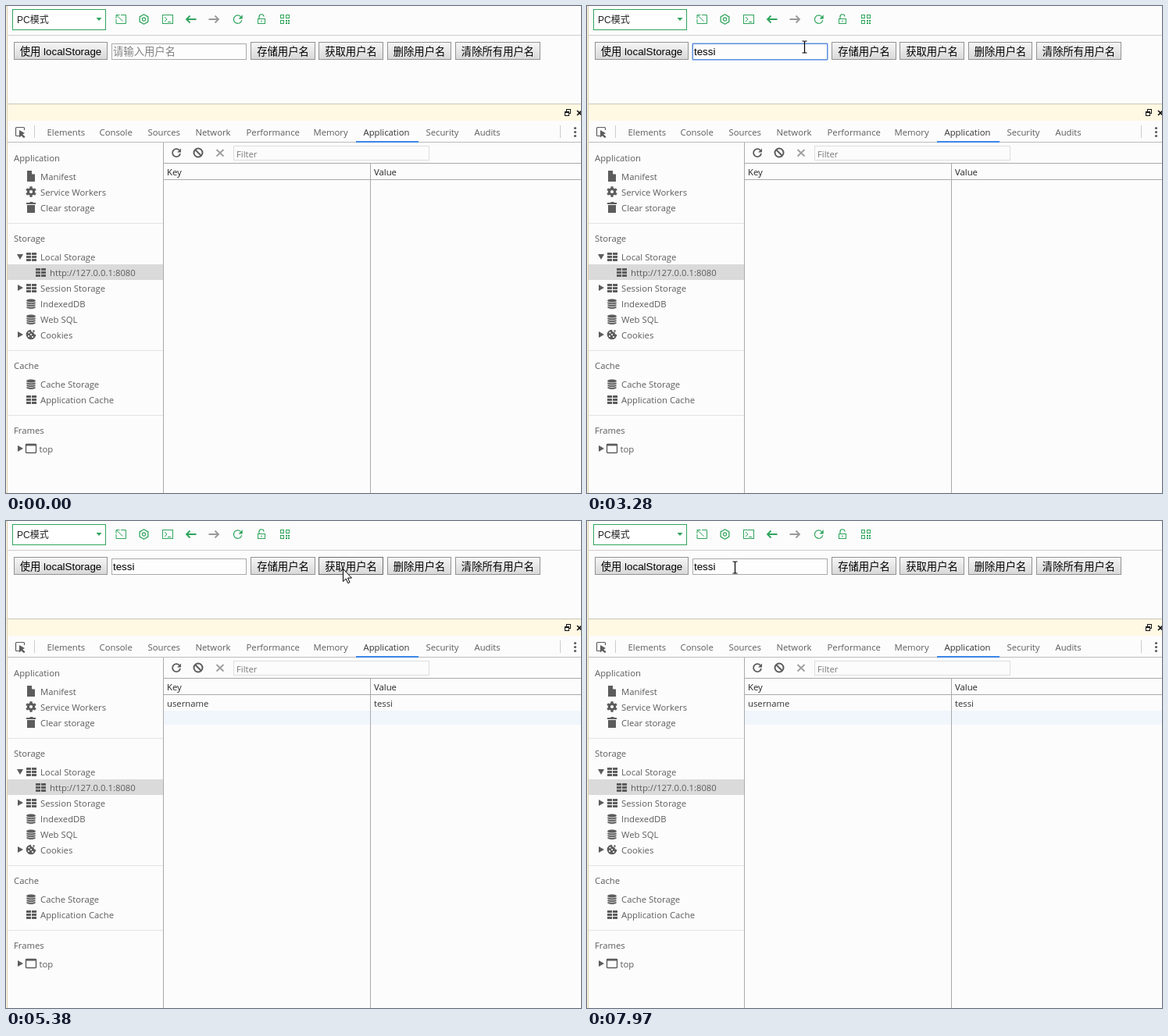
Animation, 736 px wide and 624 px high, one loop 8 s. Source, as an HTML page:

```html
<!DOCTYPE html>
<html lang="zh-CN">
<head>
<meta charset="utf-8">
<title>localStorage</title>
<style>
html, body { margin: 0; width: 100%; height: 100%; overflow: hidden; background: #fcfcfc; }
svg { display: block; }
text { white-space: pre; }
.dev { font: 11.3px "Open Sans", "Noto Sans", sans-serif; }
.form { font: 13.333px "Liberation Sans", "Noto Sans CJK SC", "Noto Sans CJK", sans-serif; }
.small { font-size: 12px; }
</style>
</head>
<body>
<svg id="stage" width="736" height="624" viewBox="0 0 736 624"></svg>
<script>
const NAME = "tessi", LOOP = 8000;
const GREEN = "#2fa45c", GREY = "#5c5c5c", LINE = "#aaaaaa";

const box = (x, y, w, h, fill, more = "") =>
  `<rect x="${x}" y="${y}" width="${w}" height="${h}" fill="${fill}" ${more}/>`;
const frame = (x, y, w, h, stroke, fill = "none", more = "") =>
  box(x + .5, y + .5, w - 1, h - 1, fill, `stroke="${stroke}" ${more}`);
const path = (d, stroke, fill = "none", more = "") =>
  `<path d="${d}" stroke="${stroke}" fill="${fill}" ${more}/>`;
const text = (x, y, s, fill = GREY, cls = "dev", more = "") =>
  `<text x="${x}" y="${y}" fill="${fill}" class="${cls}" ${more}>${s}</text>`;
const at = (x, y, s) => `<g transform="translate(${x} ${y})">${s}</g>`;

// Icons, centred on 0,0
const gear = () => {
  let s = `<circle r="3.6" fill="none" stroke="${GREY}" stroke-width="3"/>`;
  for (let a = 0; a < 360; a += 60) s += box(-1.6, -6.8, 3.2, 3, GREY, `transform="rotate(${a})"`);
  return s;
};
const grid = () => {
  let s = "";
  for (let i = 0; i < 6; i++) s += box(-6 + i % 2 * 7, -5 + (i >> 1) * 4, 6, 3, GREY);
  return s;
};
const disks = () => {
  let s = "";
  for (let i = 3; i >= 0; i--)
    s += `<ellipse cy="${i * 2.8 - 3.5}" rx="6.2" ry="2.5" fill="${GREY}" stroke="#fcfcfc" stroke-width=".8"/>`;
  return s;
};
const sheet = () => path("M-5-7H1L5-3V7H-5ZM1-7V-3H5", "none", GREY) + path("M1.5-7V-3H5", "#fcfcfc");
const bin = () => path("M-6-6H-2L-1-7H2L3-6H6V-4H-6ZM-5-3H5V7H-5Z", "none", GREY);
const cookie = () => path("M0-6.3A6.3 6.3 0 1 0 6.3 0Q3.5 0 3.5-2.8Q0-3 0-6.3Z", "none", GREY) +
  [[-2.5, -2.5], [-3, 2], [2, 3], [0, 0]].map(([x, y]) =>
    `<circle cx="${x}" cy="${y}" r="1.1" fill="#fcfcfc"/>`).join("") +
  `<circle cx="3.5" cy="-4.5" r="1.2" fill="${GREY}"/>`;
const pane = () => frame(-7, -6, 14, 12, GREY, "none", 'rx="1" stroke-width="1.4"') + box(-7, -6, 14, 2.5, GREY);
const opened = (x, y) => path(`M${x - 4} ${y - 3}h8l-4 7z`, "none", GREY);
const closed = (x, y) => path(`M${x - 3} ${y - 4}v8l7-4z`, "none", GREY);
const reload = (color, r, width) =>
  path(`M${r * .75} ${-r * .66}A${r} ${r} 0 1 0 ${r} ${r * .2}`, color, "none", `stroke-width="${width}"`) +
  path(`M${r + 1} ${-r - .5}v${r}h${-r}z`, "none", color);
const arrow = (color, flip) =>
  path("M6.5 0H-5.5M-1.5-4.5L-6 0L-1.5 4.5", color, "none", `stroke-width="1.8" transform="scale(${flip} 1)"`);

function browserBar() {
  let hex = "";
  for (let i = 0; i < 6; i++)
    hex += `${i ? "L" : "M"}${6.2 * Math.sin(i * Math.PI / 3)} ${-6.2 * Math.cos(i * Math.PI / 3)}`;
  let tiles = "";
  for (const [x, y] of [[-6, -6], [1, -6], [-6, 1]]) tiles += frame(x, y, 5, 5, GREEN);
  for (const [x, y] of [[1, 1], [4, 1], [1, 4], [4, 4]]) tiles += box(x, y, 2, 2, GREEN);
  return frame(8, 4, 120, 27, GREEN, "#fff") + text(14, 22, "PC模式", "#222", "form small") +
    path("M115.5 15h7l-3.5 4z", "none", GREEN) +
    at(147, 17, path("M0-5.5H6.5V5.5H-6V0M-6-1V-5.5H-1.5M-6-5.5L2.5 2.5", GREEN)) +
    at(176.5, 17, path(hex + "Z", GREEN, "none", 'stroke-width="1.3" stroke-linejoin="round"') +
      `<circle r="2.1" fill="none" stroke="${GREEN}" stroke-width="1.2"/>`) +
    at(207, 17, frame(-7, -6, 14, 12, GREEN) + path("M-4-3L-1 0L-4 3M0 3.5H4", GREEN)) +
    at(237, 17, arrow(GREEN, 1)) + at(266, 17, arrow("#999", -1)) +
    at(296.5, 17, reload(GREEN, 5.2, 1.2)) +
    at(327, 17, frame(-5, -1, 10, 7, GREEN) + path("M-3-1V-3A3 3 0 0 1 3-3.5M0 1.5V3.5", GREEN, "none", 'stroke-width="1.2"')) +
    at(357, 17, tiles) + box(2, 37, 734, 1, "#cfcfcf");
}

function tabs() {
  const names = [["Elements", 52.5], ["Console", 119.5], ["Sources", 181.5], ["Network", 242.5], ["Performance", 307.5],
    ["Memory", 393.5], ["Application", 457.5], ["Security", 537.5], ["Audits", 599.5]];
  return box(2, 125, 734, 1, "#c9c5b8") + box(2, 126, 734, 21, "#fff8e3") +
    frame(717, 132, 6, 6, "#111") + frame(715, 135, 6, 6, "#111", "#fff8e3") + box(715, 135, 6, 2, "#111") +
    path("M731 134l6 6m0-6l-6 6", "#111", "none", 'stroke-width="1.6"') +
    path("M17 166.5H13.5Q12.5 166.5 12.5 165.5V156.5Q12.5 155.5 13.5 155.5H22.5Q23.5 155.5 23.5 156.5V159", GREY, "none", 'stroke-width="1.2"') +
    path("M17 159v9.5l2.5-2.3 3.5 3 1.5-1.7-3.3-3 2.8-1.6z", "none", GREY) +
    box(36, 153, 1, 16, "#ccc") + box(709, 153, 1, 16, "#ccc") +
    [156.5, 161.5, 166.5].map(y => `<circle cx="728.5" cy="${y}" r="1.6" fill="${GREY}"/>`).join("") +
    names.map(([s, x]) => text(x, 166, s, s == "Application" ? "#333" : GREY)).join("") +
    box(2, 174, 734, 1, "#bcbcbc") + box(448, 173, 80, 2, "#3b86e8");
}

function sidebar() {
  const rows = [[218, "Manifest", sheet], [238, "Service Workers", gear], [258, "Clear storage", bin],
    [321, "Local Storage", grid], [341, "http://127.0.0.1:8080", grid, 12], [361, "Session Storage", grid],
    [381, "IndexedDB", disks], [401, "Web SQL", disks], [421, "Cookies", cookie],
    [484, "Cache Storage", disks], [504, "Application Cache", grid], [567, "top", pane, -1.5]];
  const heads = [[199, "Application"], [302, "Storage"], [465, "Cache"], [548, "Frames"]];
  return box(2, 331, 199, 20, "#dadada") +
    [278, 441, 524].map(y => box(2, y, 199, 1, "#e3e3e3")).join("") +
    heads.map(([y, s]) => text(10, y, s)).join("") +
    rows.map(([y, s, icon, dx = 0]) => at(32 + Math.max(dx, 0), y, icon()) + text(44 + dx, y + 5, s)).join("") +
    opened(18, 321) + closed(18, 361) + closed(18, 421) + closed(18, 567) +
    box(201, 175, 1, 449, LINE);
}

function table() {
  return at(218, 188, reload(GREY, 5, 1.8)) +
    at(246, 188, `<circle r="5.5" fill="none" stroke="${GREY}" stroke-width="2"/>` + path("M-4-4L4 4", GREY, "none", 'stroke-width="2"')) +
    path("M269.5 184l9 8.5m0-8.5l-9 8.5", "#a0a0a0", "none", 'stroke-width="2"') +
    frame(291, 179, 251, 19, "#dedede") + text(295, 194, "Filter", "#777") +
    box(202, 201, 534, 1, LINE) + box(202, 222, 534, 1, LINE) +
    text(206, 217, "Key", "#222") + text(471, 217, "Value", "#222") +
    `<g id="row">${box(202, 243, 534, 18, "#f1f6fd")}${text(206, 238, "username", "#333")}${text(471, 238, NAME, "#333")}</g>` +
    box(466, 202, 1, 422, LINE);
}

const buttons = [[10, 120, "使用 localStorage"], [313, 83, "存储用户名"], [400, 83, "获取用户名"],
  [488, 82, "删除用户名"], [575, 109, "清除所有用户名"]];
const gradient = (id, a, b) =>
  `<linearGradient id="${id}" x2="0" y2="1"><stop stop-color="${a}"/><stop offset="1" stop-color="${b}"/></linearGradient>`;

const stage = document.getElementById("stage");
stage.innerHTML = `<defs>${gradient("up", "#f6f6f6", "#d8d8d8")}${gradient("down", "#d2d2d2", "#e6e6e6")}</defs>` +
  box(0, 0, 736, 624, "#fcfcfc") + box(0, 0, 1, 624, "#fff9e8") + box(1, 0, 1, 624, "#ddd0b0") +
  browserBar() + tabs() + sidebar() + table() +
  buttons.map(([x, w, s]) => frame(x, 46, w, 23, "#939393", "url(#up)", 'class="button"') +
    text(x + w / 2, 63, s, "#000", "form", 'text-anchor="middle"')).join("") +
  frame(135, 48, 173, 21, "#a9a9a9", "#fdfdfd") +
  `<g id="ring">${frame(134, 47, 175, 23, "#a9c5f0", "none", 'rx="1"')}${frame(135, 48, 173, 21, "#5b8edb")}</g>` +
  text(137, 63, "请输入用户名", "#808080", "form", 'id="hint"') + text(137, 63, "", "#000", "form", 'id="typed"') +
  box(137, 51, 1, 15, "#000", 'id="caret"') +
  path("M.5.5V16.5L4.2 13L6.7 18.6L9 17.6L6.5 12H11.5Z", "#000", "#fff", 'id="pointer"') +
  path("M-3-7.5H-1Q0-7.5 0-6V6Q0 7.5-1 7.5H-3M3-7.5H1Q0-7.5 0-6M0 6Q0 7.5 1 7.5H3", "#000", "none", 'id="beam" stroke-width="1.2"');

const el = id => document.getElementById(id);
const [row, ring, hint, typed, caret, pointer, beam] =
  ["row", "ring", "hint", "typed", "caret", "pointer", "beam"].map(el);
const faces = [...document.querySelectorAll(".button")];

const show = (node, on) => node.setAttribute("visibility", on ? "visible" : "hidden");
const within = (t, a, b) => t >= a && t < b;

// start, end, number of steps, waypoints
const moves = [
  [40, 780, 18, [[706, 611], [664, 556], [611, 494], [543, 409], [455, 330], [360, 262], [265, 197], [222, 168], [190, 155],
    [172, 147], [155, 118], [144, 98], [143, 92], [148, 89], [157, 83], [168, 77], [178, 71], [182, 64]]],
  [3200, 3530, 8, [[225, 58], [278, 52], [318, 50], [340, 52], [350, 55], [356, 56], [359, 57], [361, 57]]],
  [4810, 5380, 14, [[361, 57], [375, 58], [405, 60], [425, 60], [431, 61]]],
  [7520, 7970, 12, [[428, 61], [395, 60], [330, 53], [250, 50], [205, 55], [189, 59]]]
];
const keys = [1980, 2095, 2210, 2400, 2490];

function cursorAt(t) {
  const move = moves.filter(m => t >= m[0]).pop();
  if (!move) return null;
  const [start, end, steps, pts] = move;
  const k = Math.min(steps - 1, Math.floor((t - start) / (end - start) * (steps - 1) + 1e-6));
  const p = k / (steps - 1) * (pts.length - 1), i = Math.min(pts.length - 2, Math.floor(p)), f = p - i;
  return pts[i].map((v, j) => Math.round(v + (pts[i + 1][j] - v) * f));
}

function draw(t) {
  const cursor = cursorAt(t), [x, y] = cursor || [-99, -99];
  const overInput = within(x, 135, 308) && within(y, 48, 69);
  show(pointer, cursor && !overInput);
  show(beam, overInput);
  pointer.setAttribute("transform", `translate(${x} ${y})`);
  beam.setAttribute("transform", `translate(${x + .5} ${y + .5})`);

  const pressed = within(t, 3690, 3820) || within(t, 6250, 6370);
  faces.forEach((face, i) => {
    const over = within(x, buttons[i][0], buttons[i][0] + buttons[i][1]) && within(y, 46, 69);
    face.setAttribute("stroke", over ? "#6c6c6c" : "#939393");
    face.setAttribute("fill", over && pressed ? "url(#down)" : "url(#up)");
  });

  const value = NAME.slice(0, keys.filter(k => t >= k).length);
  if (typed.textContent != value) typed.textContent = value;
  show(hint, !value);
  show(ring, within(t, 1030, 3690));
  show(caret, within(t, 1030, 1570) || within(t, 1980, 2980) || within(t, 3490, 3690));
  caret.setAttribute("x", 137 + Math.floor(value ? typed.getComputedTextLength() : 0));
  show(row, t >= 3820);
}

const begin = performance.now();
function tick() {
  draw((performance.now() - begin) % LOOP);
  requestAnimationFrame(tick);
}
tick();
</script>
</body>
</html>
```
